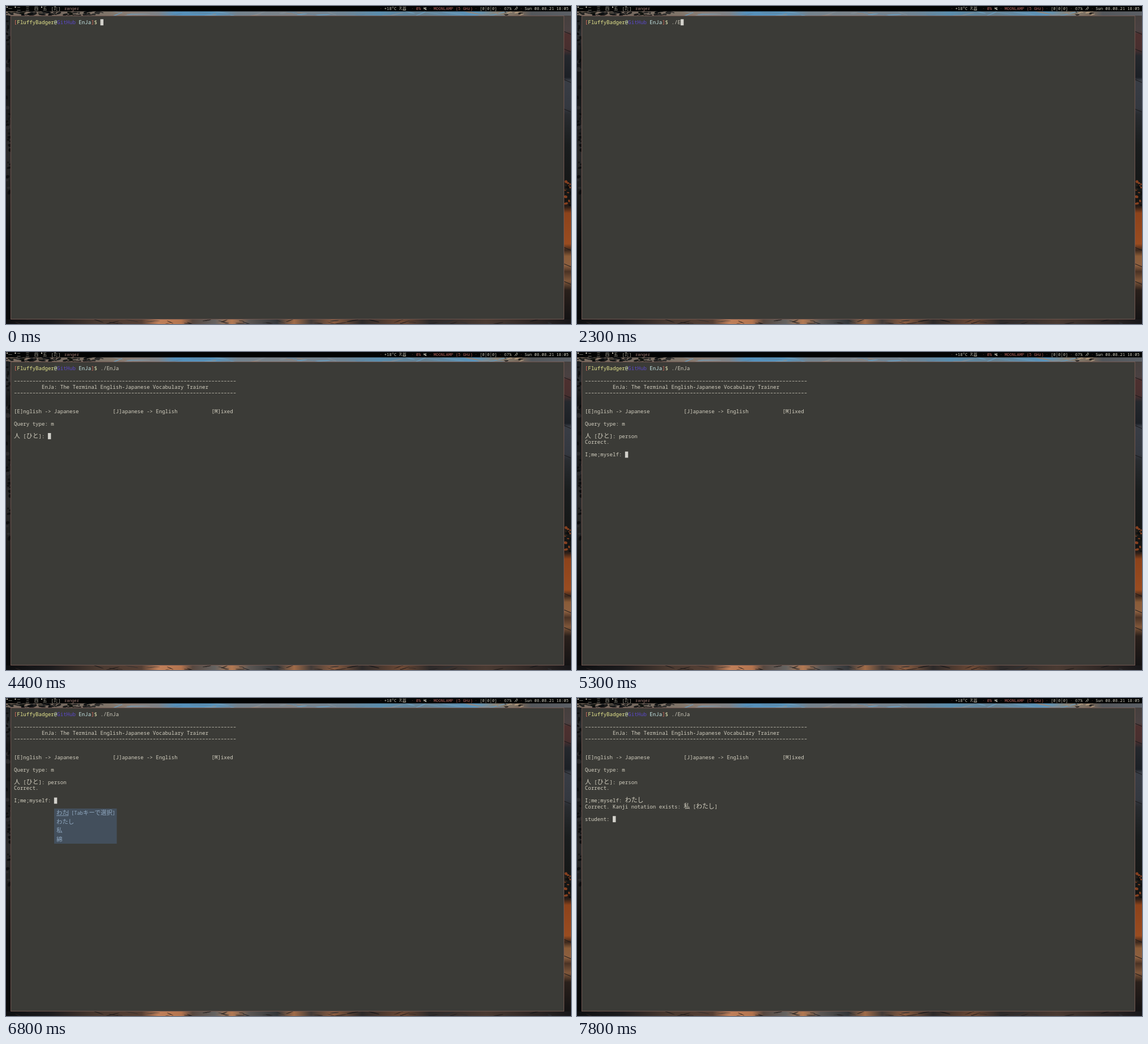
Animation, 997 px wide and 561 px high, one loop 8000 ms. Source, as an HTML page with a canvas:

```html
<!DOCTYPE html>
<html lang="en">
<head>
<meta charset="utf-8">
<title>Vocabulary trainer</title>
<style>
html, body { margin: 0; width: 100%; height: 100%; overflow: hidden; background: #000; }
canvas { display: block; }
</style>
</head>
<body>
<canvas id="stage" width="997" height="561"></canvas>
<script>
const W = 997, H = 561, LOOP = 8000;
const CELL = 5.446, LINE = 10.88, LEFT = 14, TOP = 23.3;
const FG = '#d3cfc0', RED = '#b4625a', GREY = '#b9b5a6';
const ctx = document.getElementById('stage').getContext('2d');
const backdrop = Object.assign(document.createElement('canvas'), { width: W, height: H });
const isWide = c => /[\u3000-\u9fff\uff00-\uff60]/.test(c);

// Writes text on a fixed grid; wide characters take two cells. Returns the next x.
function put(g, text, x, y, color, cell = CELL) {
  g.fillStyle = color;
  for (const c of text) {
    const wide = isWide(c);
    g.font = wide ? `${cell * 2}px "Noto Sans CJK JP", "Noto Sans CJK", sans-serif`
                  : `${cell / 0.6}px "Noto Sans Mono", "DejaVu Sans Mono", monospace`;
    g.fillText(c, x, y);
    x += wide ? cell * 2 : cell;
  }
  return x;
}

function strip(g, x, y, w, h, stops) {
  const fill = w > h ? g.createLinearGradient(x, 0, x + w, 0) : g.createLinearGradient(0, y, 0, y + h);
  stops.forEach(([at, color]) => fill.addColorStop(at, color));
  g.fillStyle = fill;
  g.fillRect(x, y, w, h);
}

function paintWallpaper(g) {
  let seed = 11;
  const rnd = () => (seed = seed * 16807 % 2147483647) / 2147483647;
  const dabs = (n, x, y, w, h, colors, long, thick) => {
    for (let i = 0; i < n; i++) {
      g.fillStyle = colors[Math.floor(rnd() * colors.length)];
      g.beginPath();
      g.ellipse(x + rnd() * w, y + rnd() * h, long * (0.4 + rnd()), thick * (0.4 + rnd()), (rnd() - 0.5) * 0.8, 0, 7);
      g.fill();
    }
  };
  strip(g, 0, 9, W, 9, [[0, '#7d6e62'], [0.1, '#75695f'], [0.18, '#7f7469'], [0.22, '#8b7d74'],
    [0.27, '#7d8288'], [0.3, '#5590bb'], [0.37, '#5a93ba'], [0.41, '#74828d'], [0.5, '#7c8288'],
    [0.6, '#6f8494'], [0.66, '#5a8dad'], [0.74, '#677f8e'], [0.83, '#5a95bd'], [0.87, '#8a8478'],
    [0.91, '#77685a'], [0.93, '#54575b'], [1, '#5b5f65']]);
  dabs(40, 180, 10, 690, 8, ['#828d96', '#5d86a4', '#92867c', '#6b9ab9'], 15, 0.8);
  strip(g, 0, 17, 9, 544, [[0, '#191c1e'], [0.06, '#2a2c2e'], [0.12, '#151617'], [0.34, '#1b1c1d'],
    [0.45, '#2a2a2a'], [0.6, '#191a1a'], [0.75, '#0c0d0e'], [1, '#08090a']]);
  dabs(75, 0, 9, 172, 8, ['#0b0e10', '#1b1b1b', '#2e2d2c', '#10130f'], 4, 1.3);
  dabs(45, 0, 17, 8, 340, ['#0d0e0f', '#29292a', '#131415'], 3, 3);
  strip(g, 985, 17, 12, 544, [[0, '#453f3d'], [0.05, '#4a4142'], [0.06, '#4d302f'], [0.11, '#482f2f'],
    [0.13, '#25282d'], [0.2, '#1c2026'], [0.21, '#393d45'], [0.3, '#343840'], [0.32, '#292c30'],
    [0.42, '#1a1d1e'], [0.6, '#141514'], [0.62, '#2b1f19'], [0.64, '#8d431b'], [0.74, '#9a4c20'],
    [0.76, '#3b281d'], [0.78, '#8a5c38'], [0.81, '#8d6040'], [0.83, '#4b3325'], [0.86, '#80573a'],
    [0.89, '#2a201b'], [1, '#111113']]);
  dabs(18, 985, 310, 12, 45, ['#0d0e0e', '#86401f', '#292119'], 3, 2);
  g.strokeStyle = '#1b1a1b';
  for (const y of [45, 76, 130, 182, 426, 455, 486]) {
    g.beginPath();
    g.moveTo(985, y);
    g.lineTo(997, y + 5);
    g.stroke();
  }
  strip(g, 0, 553, W, 8, [[0, '#0d0e10'], [0.08, '#1d1c1e'], [0.16, '#4a3a31'], [0.24, '#553f34'],
    [0.27, '#c0805a'], [0.31, '#b4744e'], [0.33, '#57473f'], [0.37, '#656361'], [0.4, '#b37952'],
    [0.43, '#5b5653'], [0.48, '#34373a'], [0.51, '#a06b48'], [0.54, '#423b38'], [0.58, '#8b5c40'],
    [0.63, '#2c2929'], [0.7, '#6d4935'], [0.75, '#2d2a2a'], [0.85, '#4a3a32'], [1, '#18171a']]);
  dabs(45, 0, 554, 997, 7, ['#1b1b1d', '#2f3033', '#27211f'], 9, 0.6);
  dabs(12, 880, 10, 35, 7, ['#1b1a19', '#b9a184', '#35312e'], 4, 1);
}

function paintBar(g) {
  const y = 7.2, cell = 4.33;
  g.fillStyle = '#030404';
  g.fillRect(0, 0, W, 9.5);
  [['一', 4], ['二', 19], ['三', 34.5], ['四', 50], ['五', 65]].forEach(([s, x]) => put(g, s, x, y, GREY, 3.5));
  g.fillStyle = FG;
  for (const x of [1, 15.5, 62]) g.fillRect(x, 1, 2, 2);
  put(g, '[', 79.5, y, GREY, cell);
  put(g, 'た', 83.7, y, GREY, 4);
  put(g, ']', 92, y, GREY, cell);
  put(g, 'ranger', 103, y, '#a47e76', cell);
  for (const x of [659.5, 715, 746, 827, 870, 907]) put(g, '·', x, y, '#8b4d48', cell);
  put(g, '+18°C', 667.5, y, FG, cell);
  put(g, '0%', 723.5, y, RED, cell);
  put(g, 'MOONLAMP (5 GHz)', 754.5, y, RED, cell);
  put(g, '[0|0|0]', 836, y, GREY, cell);
  put(g, '67%', 879, y, GREY, cell);
  put(g, 'Sun 08.08.21 18:05', 915, y, FG, cell);
  g.lineWidth = 0.8;
  const icon = (color, path) => { g.strokeStyle = color; g.stroke(new Path2D(path)); };
  icon(GREY, 'M694 2h4l-2 2l3 3M695 4v3M700 2h6M701 4h4v3h-4zM700 7h6');
  icon(FG, 'M737 4h2l2-2v5l-2-2h-2zM737 2l5 5');
  icon(GREY, 'M897 7l2-2l2 1l2-3l-2-1l-2 3M901 2l1-1');
}

function paintWindow(g) {
  g.fillStyle = '#3b3b37';
  g.fillRect(8, 17, 977, 536);
  g.strokeStyle = '#70564f';
  g.lineWidth = 1;
  g.strokeRect(8.5, 17.5, 976, 535);
}

paintWallpaper(backdrop.getContext('2d'));
paintBar(backdrop.getContext('2d'));
paintWindow(backdrop.getContext('2d'));

const at = (t, steps) => steps.reduce((value, [time, next]) => t >= time ? next : value, '');

const COMMAND = [[700, '.'], [900, './'], [1200, './e'], [2100, './'], [2300, './E'], [2600, './EnJa ']];
const ANSWER = [[4500, 'p'], [4600, 'pe'], [4800, 'per'], [5000, 'perso'], [5100, 'person']];
const POPUP = [
  [6300, ['ｗ', 'w [[半] アルファベット]']],
  [6600, ['わ', 'わ', '和', '輪']],
  [6800, ['わた', 'わたし', '私', '綿']],
  [6900, ['わたｓ', 'わたし', '私', '綿']],
  [7100, ['わたｓｈ', 'わたし', '私', '綿']],
  [7200, ['わたし', 'わたし', '私']],
  [7700, '']
];
const PROMPT = [['[', '#dc6e5e'], ['FluffyBadger', '#e9e98f'], ['@', '#d5e5bc'], ['GitHub', '#5a48c8'],
  [' EnJa', '#c9eceb'], [']', '#dc6e5e'], ['$ ', '#dddfae']];

function drawPopup(rows, alpha) {
  const cell = 5.2, x = 89, hint = ' [Tabキーで選択]', ink = '#91a9c1';
  const [typed, ...choices] = rows;
  const width = s => [...s].reduce((sum, c) => sum + (isWide(c) ? 2 : 1) * cell, 0);
  const w = Math.max(width(typed + hint), ...choices.map(width)) + 6.5;
  ctx.globalAlpha = alpha;
  ctx.fillStyle = '#434f5c';
  ctx.fillRect(85, 195, w, rows.length * 15.5);
  const end = put(ctx, typed, x, 206, ink, cell);
  put(ctx, hint, end, 206, ink, cell);
  ctx.fillRect(x, 207.3, end - x, 0.8);
  ctx.fillRect(end - 0.5, 198, 0.8, 9.5);
  choices.forEach((s, i) => put(ctx, s, x, 221.5 + i * 15.5, ink, cell));
  ctx.globalAlpha = 1;
}

function draw(t) {
  let x, row;
  const write = (r, text, color = FG, col = 0) => {
    row = r;
    x = put(ctx, text, LEFT + col * CELL, TOP + r * LINE + 8.6, color);
  };
  ctx.drawImage(backdrop, 0, 0);
  let col = 0;
  for (const [text, color] of PROMPT) {
    write(0, text, color, col);
    col += text.length;
  }
  write(0, at(t, COMMAND), FG, col);
  if (t >= 2900) {
    write(2, '–'.repeat(72));
    write(3, 'EnJa: The Terminal English-Japanese Vocabulary Trainer', FG, 9);
    write(4, '–'.repeat(72));
    write(7, '[E]nglish -> Japanese');
    write(7, '[J]apanese -> English', FG, 32);
    write(7, '[M]ixed', FG, 64);
    write(9, 'Query type: ' + at(t, [[3600, 'm']]));
  }
  if (t >= 3800) write(11, '人 [ひと]: ' + at(t, ANSWER));
  if (t >= 5300) {
    write(12, 'Correct.');
    write(14, 'I;me;myself: ' + at(t, [[7600, 'わたし']]));
  }
  if (t >= 7800) {
    write(15, 'Correct. Kanji notation exists: 私 [わたし]');
    write(17, 'student: ');
  }
  ctx.fillStyle = '#d2d1cb';
  ctx.fillRect(x, TOP + row * LINE, CELL, LINE);
  const rows = at(t, POPUP);
  if (rows) drawPopup(rows, t >= 7600 ? 0.5 : at(t, [[0, 0.2], [6400, 0.5], [6500, 1]]));
}

function tick() {
  draw(performance.now() % LOOP);
  requestAnimationFrame(tick);
}
tick();
</script>
</body>
</html>
```
